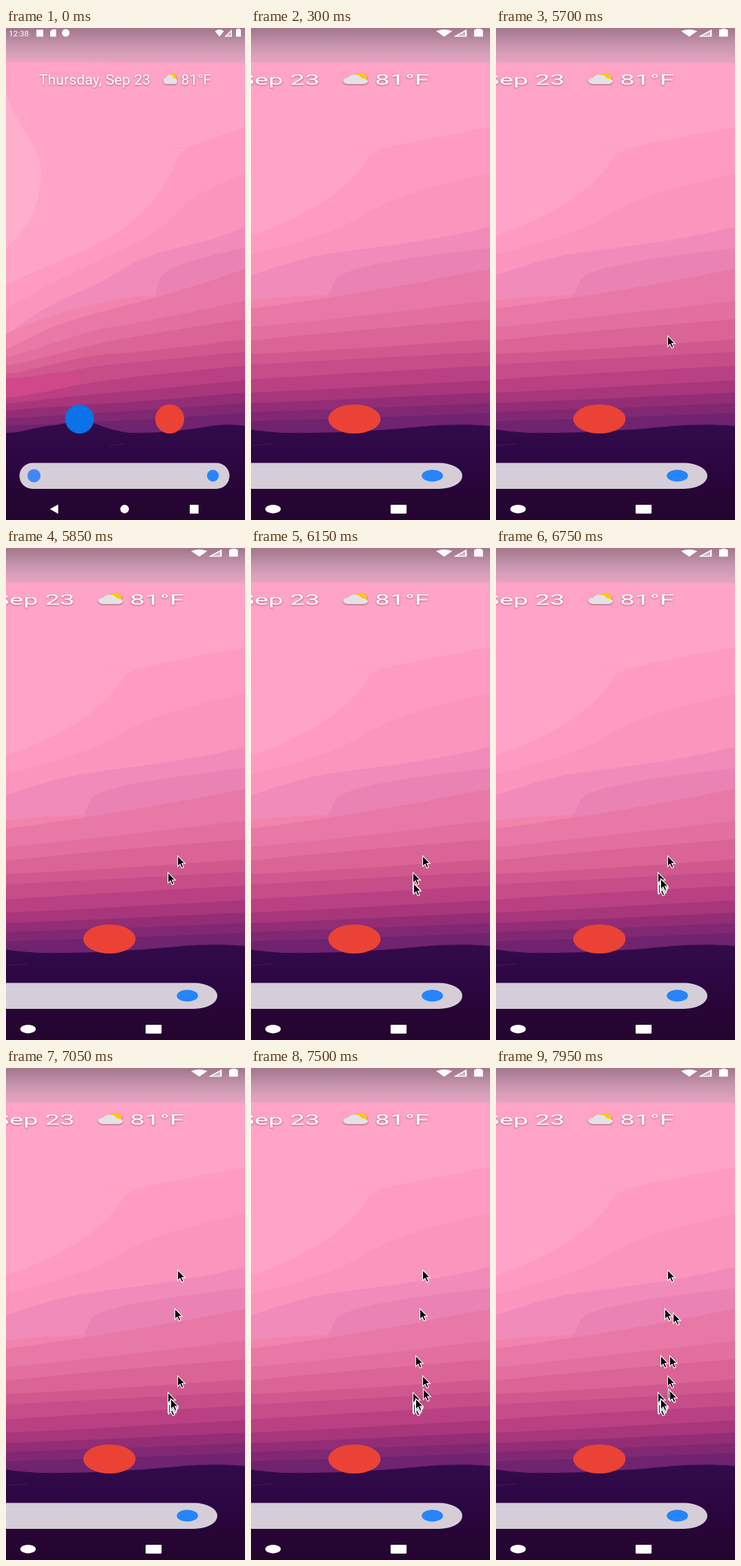
These frames come from a looping animation (346 px wide and 711 px high, 8 s). An HTML page without scripts:

```html
<!DOCTYPE html>
<html lang="en">
<head>
<meta charset="utf-8">
<title>Phone home screen</title>
<style>
html, body { margin: 0; width: 100%; height: 100%; overflow: hidden; background: #260532; }
svg { display: block; width: 100vw; height: 100vh; }
text { font-family: Roboto, "Open Sans", sans-serif; fill: #fff; }
.glance { font-size: 21px; letter-spacing: .15px; filter: drop-shadow(0 1px 1px #0006); }
</style>
</head>
<body>
<svg viewBox="0 0 346 711" preserveAspectRatio="none">
  <defs>
    <linearGradient id="haze" x2="0" y2="1">
      <stop stop-color="#a2768b"/>
      <stop offset=".25" stop-color="#b3869d"/>
      <stop offset=".5" stop-color="#c895ae"/>
      <stop offset=".75" stop-color="#d89fb9"/>
      <stop offset="1" stop-color="#eaa3c3"/>
    </linearGradient>
    <linearGradient id="land" x2="0" y2="1">
      <stop stop-color="#330b4b"/>
      <stop offset=".4" stop-color="#2c0743"/>
      <stop offset=".75" stop-color="#260534"/>
      <stop offset="1" stop-color="#24052e"/>
    </linearGradient>
    <path id="arrow" d="M1.500 .8v15.400l3.500-3.300 2.500 5.600 2.600-1.100-2.500-5.500h4.700z" fill="#000" stroke="#fff" stroke-width="1.1"/>
  </defs>

  <g>
    <animateTransform attributeName="transform" type="translate" values="0 0;-278 0" keyTimes="0;.0375" calcMode="discrete" dur="8s" repeatCount="indefinite"/>
    <g>
      <animateTransform attributeName="transform" type="scale" values="1 1;1.805 1" keyTimes="0;.0375" calcMode="discrete" dur="8s" repeatCount="indefinite"/>

      <!-- sky -->
      <path fill="#ffa4c7" d="M0 0h346v711H0z"/>
      <path fill="#ffafcb" d="M0 92C16 150 56 170 50 220S36 282 0 318z"/>
      <path fill="#ff9ac2" d="M346 143C305 158 265 168 250 182 240 215 215 262 154 300 105 330 50 345 0 372V711h346z"/>
      <path fill="#fc95be" d="M346 210C300 228 265 245 240 275 200 318 90 345 0 408V711h346z"/>
      <path fill="#f18bba" d="M346 287C300 308 255 316 220 325 180 336 150 364 110 380S40 412 0 445V711h346z"/>
      <path fill="#ea83b4" d="M346 318C290 330 235 342 222 362L216 388 140 410V711h206z"/>
      <path fill="#f283ad" d="M216 386C150 388 70 412 0 442V711h250z"/>
      <path fill="#e878a5" d="M346 348C300 364 250 382 154 406S40 446 0 466V711h346z"/>
      <path fill="#e26f9d" d="M346 394C290 406 200 425 154 432S40 468 0 476V711h346z"/>
      <path fill="#da6495" d="M346 421C290 429 210 441 154 452S40 482 0 488V711h346z"/>
      <path fill="#cf598f" d="M346 450C280 458 220 466 154 471S50 494 0 500V711h346z"/>
      <path fill="#c54e88" d="M346 468C280 474 200 482 154 486S50 507 0 512V711h346z"/>
      <path fill="#d0488a" d="M0 506C40 508 70 492 100 499S70 534 0 540z"/>
      <path fill="#b94083" d="M346 488C280 494 210 501 154 508S50 529 0 535V711h346z"/>
      <path fill="#a8367a" d="M346 509C280 515 210 523 154 527S50 538 0 543V711h346z"/>
      <path fill="#932d75" d="M346 527C280 532 210 539 154 542S50 549 0 553V711h346z"/>
      <path fill="#812872" d="M346 542C280 547 210 552 154 555S50 562 0 564V711h346z"/>
      <path fill="#70236f" d="M346 556C280 561 210 566 154 568S50 573 0 575V711h346z"/>
      <path fill="url(#haze)" d="M0 0h346v51L0 49z"/>
      <path fill="none" stroke="#f79bc0" stroke-width=".6" d="M235 173.500h50"/>

      <!-- hills -->
      <path fill="url(#land)" d="M0 585C25 585 40 577 62 575S92 568 113 568C128 568 142 581 180 585 215 586 255 582 285 577 305 573 325 572 346 575V711H0z"/>
      <path fill="none" stroke="#4a1458" d="M148 605l9-2 14-2"/>

      <!-- status bar -->
      <g fill="#fff">
        <text x="4" y="11.500" font-size="11.700">12:38</text>
        <rect x="44" y="2.500" width="10" height="10"/>
        <path d="M67 2h5.500v10.500H64V5z"/>
        <circle cx="86.500" cy="7" r="5.500"/>
        <path d="M302.500 4.500Q309 -.5 315.500 4.500L309 12.500z"/>
        <path d="M327 2v10.500h-10.500z" fill-opacity=".4"/>
        <path d="M327 2v10.500h-10.500zM325.800 5l-6.300 6.300h6.300z" fill-rule="evenodd"/>
        <path d="M334.500 1h4v1.300h1.500v10.200h-7V2.300h1.500z"/>
      </g>

      <!-- date and weather -->
      <g class="glance">
        <text x="47.800" y="82">Thursday, Sep 23</text>
        <circle cx="241.500" cy="71" r="5.500" fill="#fcc80c"/>
        <path fill="#e4e2e5" d="M232 81a4.800 4.800 0 0 1 0-9.500Q234 66.500 238 67.500 242 68.500 243 73a4 4 0 0 1 1.500 8z"/>
        <text x="253.500" y="82">81°F</text>
      </g>

      <!-- apps and search -->
      <circle cx="106.500" cy="565" r="21" fill="#0b72e7"/>
      <circle cx="237" cy="565" r="21" fill="#ea4335"/>
      <rect x="19.500" y="628.500" width="304" height="37.500" rx="18.750" fill="#d5ced9"/>
      <circle cx="40.500" cy="647" r="9.500" fill="#4285f4"/>
      <circle cx="299.500" cy="647" r="8.500" fill="#2684fc"/>

      <!-- navigation -->
      <g fill="#fff">
        <path d="M75.500 688.500v13.500L63.500 695.200z"/>
        <circle cx="171.700" cy="695.200" r="6.200"/>
        <rect x="266" y="689" width="12.800" height="12.700" rx=".8"/>
      </g>
    </g>
  </g>

  <!-- pointer stamps, each staying until the loop restarts -->
  <g>
    <use href="#arrow" x="247" y="444" opacity="0"><animate attributeName="opacity" values="0;1" keyTimes="0;.7125" calcMode="discrete" dur="8s" repeatCount="indefinite"/></use>
    <use href="#arrow" x="233" y="468" opacity="0"><animate attributeName="opacity" values="0;1" keyTimes="0;.73125" calcMode="discrete" dur="8s" repeatCount="indefinite"/></use>
    <use href="#arrow" x="233" y="482" opacity="0"><animate attributeName="opacity" values="0;1" keyTimes="0;.75" calcMode="discrete" dur="8s" repeatCount="indefinite"/></use>
    <use href="#arrow" x="234" y="484" opacity="0"><animate attributeName="opacity" values="0;1" keyTimes="0;.76875" calcMode="discrete" dur="8s" repeatCount="indefinite"/></use>
    <use href="#arrow" x="236" y="481" opacity="0"><animate attributeName="opacity" values="0;1" keyTimes="0;.7875" calcMode="discrete" dur="8s" repeatCount="indefinite"/></use>
    <use href="#arrow" x="236" y="480" opacity="0"><animate attributeName="opacity" values="0;1" keyTimes="0;.80625" calcMode="discrete" dur="8s" repeatCount="indefinite"/></use>
    <use href="#arrow" x="237" y="479" opacity="0"><animate attributeName="opacity" values="0;1" keyTimes="0;.825" calcMode="discrete" dur="8s" repeatCount="indefinite"/></use>
    <use href="#arrow" x="237" y="477" opacity="0"><animate attributeName="opacity" values="0;1" keyTimes="0;.84375" calcMode="discrete" dur="8s" repeatCount="indefinite"/></use>
    <use href="#arrow" x="243" y="347" opacity="0"><animate attributeName="opacity" values="0;1" keyTimes="0;.8625" calcMode="discrete" dur="8s" repeatCount="indefinite"/></use>
    <use href="#arrow" x="247" y="291" opacity="0"><animate attributeName="opacity" values="0;1" keyTimes="0;.88125" calcMode="discrete" dur="8s" repeatCount="indefinite"/></use>
    <use href="#arrow" x="237" y="415" opacity="0"><animate attributeName="opacity" values="0;1" keyTimes="0;.91875" calcMode="discrete" dur="8s" repeatCount="indefinite"/></use>
    <use href="#arrow" x="248" y="463" opacity="0"><animate attributeName="opacity" values="0;1" keyTimes="0;.9375" calcMode="discrete" dur="8s" repeatCount="indefinite"/></use>
    <use href="#arrow" x="250" y="465" opacity="0"><animate attributeName="opacity" values="0;1" keyTimes="0;.95625" calcMode="discrete" dur="8s" repeatCount="indefinite"/></use>
    <use href="#arrow" x="250" y="415" opacity="0"><animate attributeName="opacity" values="0;1" keyTimes="0;.975" calcMode="discrete" dur="8s" repeatCount="indefinite"/></use>
    <use href="#arrow" x="255" y="353" opacity="0"><animate attributeName="opacity" values="0;1" keyTimes="0;.99375" calcMode="discrete" dur="8s" repeatCount="indefinite"/></use>
  </g>
</svg>
</body>
</html>
```
